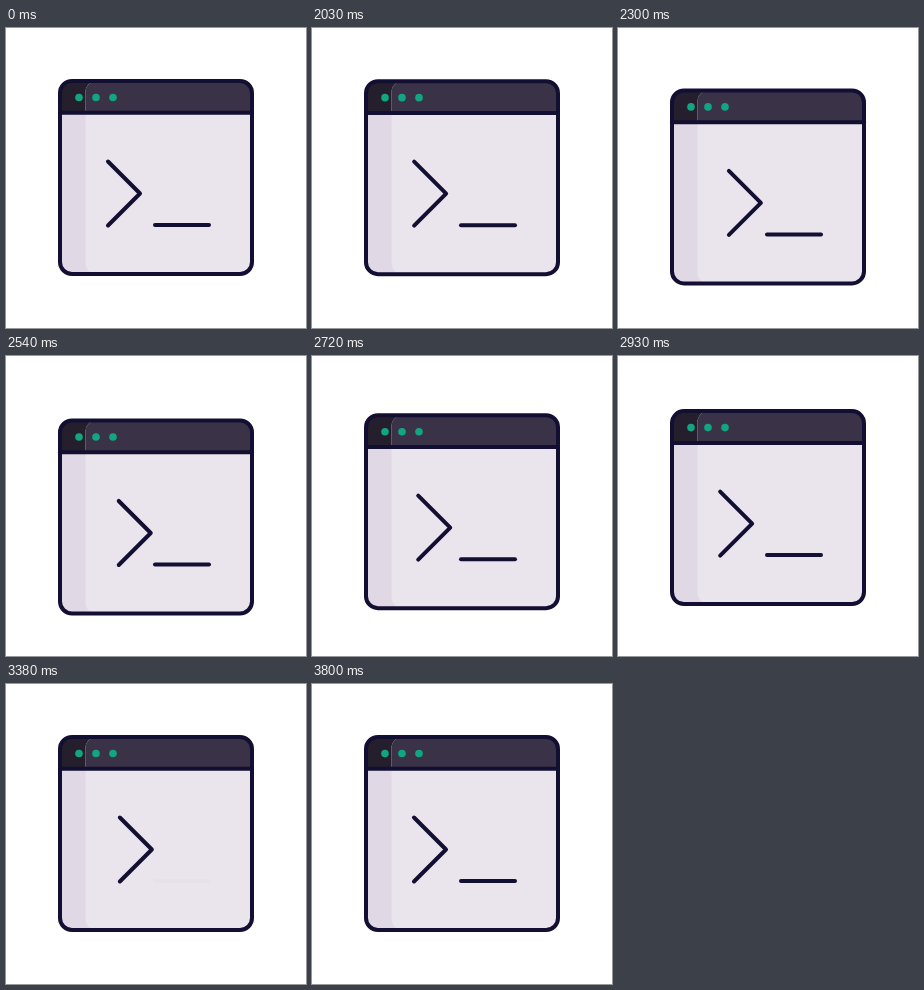
Recreate the animation shown at these times as an HTML page. Size 300x300 px, loop 3.86 s.

```html
<!DOCTYPE html>
<html lang="en">
<head>
<meta charset="utf-8">
<title>Terminal window</title>
<style>
  html, body { margin: 0; width: 100%; height: 100%; overflow: hidden; background: #fff; }
  svg { display: block; width: 100%; height: 100%; }
</style>
</head>
<body>
<svg viewBox="0 0 300 300">
  <defs>
    <clipPath id="frame"><rect x="54" y="53" width="192" height="193" rx="12"/></clipPath>
    <clipPath id="face"><rect x="79.5" y="53" width="190" height="193" rx="11"/></clipPath>
  </defs>
  <g id="win">
    <g clip-path="url(#frame)">
      <rect x="54" y="53" width="192" height="193" fill="#e0d8e5"/>
      <rect x="54" y="53" width="192" height="32" fill="#251f2d"/>
      <g clip-path="url(#face)">
        <rect x="54" y="53" width="192" height="193" fill="#eae5ec"/>
        <rect x="54" y="53" width="192" height="32" fill="#3a3347"/>
      </g>
    </g>
    <g fill="#12a582">
      <circle cx="73" cy="69.5" r="3.8"/>
      <circle cx="90" cy="69.5" r="3.8"/>
      <circle cx="107" cy="69.5" r="3.8"/>
    </g>
    <g fill="none" stroke="#120f32" stroke-width="4" stroke-linecap="round" stroke-linejoin="round">
      <rect x="54" y="53" width="192" height="193" rx="12"/>
      <path d="M54 84.8H246"/>
      <path id="chevron" d="M102 133.5L134 165.5L102 197.5"/>
      <path id="cursor" d="M149 197H203"/>
    </g>
  </g>
</svg>
<script>
  const LOOP = 3860, HOLD = 2030, STEP = 30;
  const START = 2000, BEAT = 450;
  const win = document.getElementById('win');
  const chevron = document.getElementById('chevron');
  const cursor = document.getElementById('cursor');

  const clamp = v => Math.min(1, Math.max(0, v));
  const smooth = v => v * v * (3 - 2 * v);

  function bezier(x1, y1, x2, y2) {
    const at = (a, b, s) => 3 * a * s * (1 - s) ** 2 + 3 * b * s * s * (1 - s) + s ** 3;
    return x => {
      let lo = 0, hi = 1;
      for (let i = 0; i < 24; i++) {
        const mid = (lo + hi) / 2;
        if (at(x1, x2, mid) < x) lo = mid; else hi = mid;
      }
      return at(y1, y2, (lo + hi) / 2);
    };
  }
  const settle = bezier(0.25, 0.1, 0.25, 1);

  // 0 -> 1 -> 0 across two beats
  const swing = beat => smooth(clamp(1 - Math.abs(beat - 1)));

  function draw(time) {
    const t = time < HOLD ? 0 : HOLD + Math.floor((time - HOLD) / STEP) * STEP;
    const beat = clamp((t - START) / (4 * BEAT)) * 4;
    const drop = beat < 1
      ? 12.7 * smooth(beat)
      : 12.7 * (1 - settle(clamp((beat - 1) / 2)));
    const nudge = 12 * (swing(beat) + swing(beat - 2));

    win.setAttribute('transform', `translate(0 ${drop.toFixed(3)})`);
    chevron.setAttribute('transform', `translate(${nudge.toFixed(3)} 0)`);
    cursor.setAttribute('opacity', (1 - swing(beat - 2)).toFixed(3));
  }

  const origin = performance.now();
  function tick() {
    draw((performance.now() - origin) % LOOP);
    requestAnimationFrame(tick);
  }
  tick();
</script>
</body>
</html>
```
